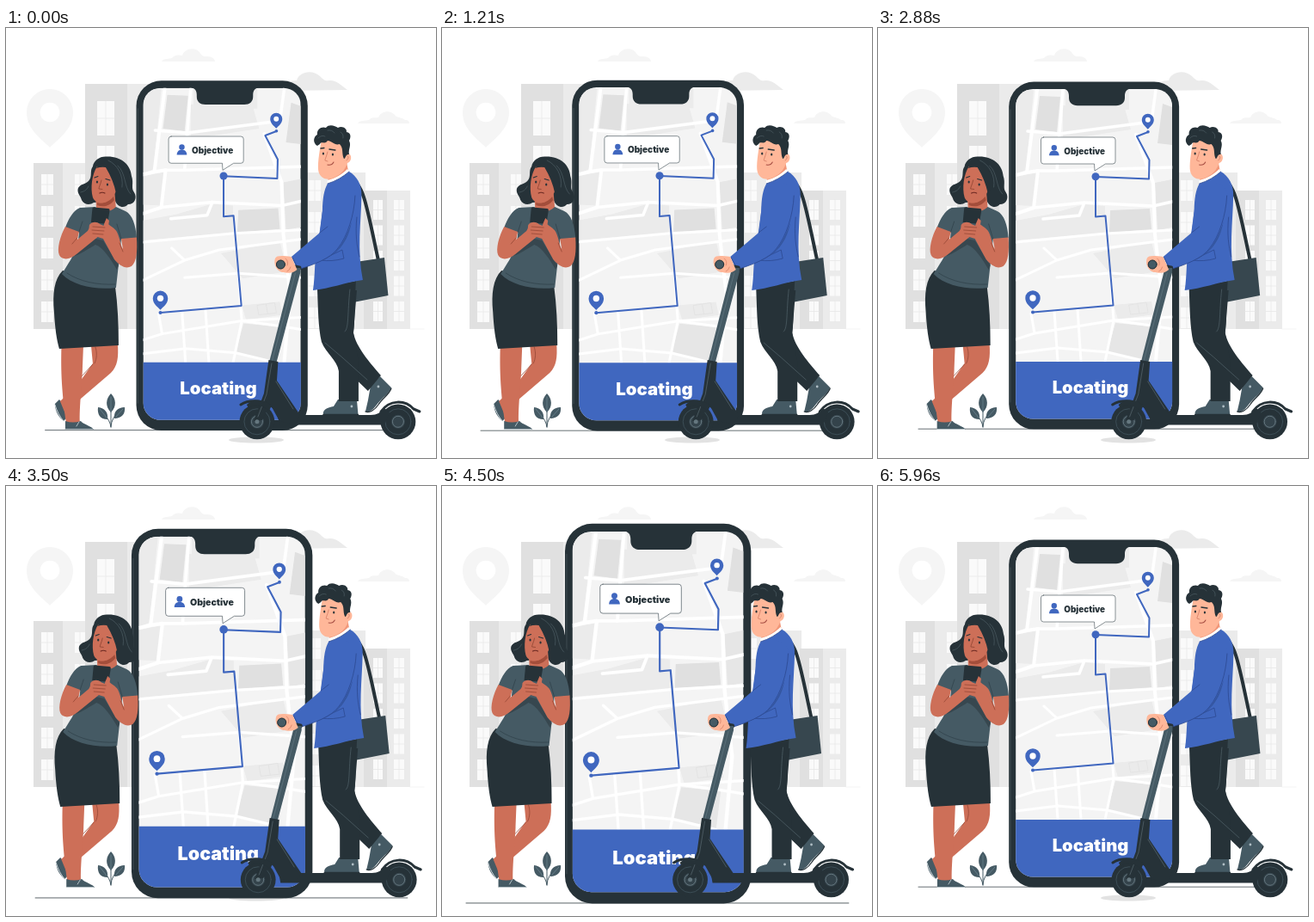
Recreate the animation shown at these times as an HTML page with a canvas. Size 500 px wide and 500 px high, loop 6 s.

```html
<!DOCTYPE html>
<html lang="en">
<head>
<meta charset="utf-8">
<title>Locating</title>
<style>
html, body { margin: 0; width: 100%; height: 100%; overflow: hidden; background: #fff; }
canvas { display: block; width: 500px; height: 500px; }
</style>
</head>
<body>
<canvas id="stage"></canvas>
<script>
const canvas = document.getElementById('stage');
const ctx = canvas.getContext('2d');
const dpr = window.devicePixelRatio || 1;
canvas.width = canvas.height = 500 * dpr;

const INK = '#263238', SLATE = '#455a64', BLUE = '#4067bf', NAVY = '#2c4a91';
const SKIN = '#cd6f58', SKIN_LINE = '#8f4331', PEACH = '#ffb799', PEACH_LINE = '#d9836a';

function fill(color, d) {
  ctx.fillStyle = color;
  ctx.fill(new Path2D(d));
}
function line(color, width, d) {
  ctx.strokeStyle = color;
  ctx.lineWidth = width;
  ctx.lineCap = ctx.lineJoin = 'round';
  ctx.stroke(new Path2D(d));
}
function rect(color, x, y, w, h, r = 0) {
  ctx.fillStyle = color;
  ctx.beginPath();
  ctx.roundRect(x, y, w, h, r);
  ctx.fill();
}
function oval(color, x, y, rx, ry = rx) {
  ctx.fillStyle = color;
  ctx.beginPath();
  ctx.ellipse(x, y, rx, ry, 0, 0, Math.PI * 2);
  ctx.fill();
}
function ring(color, width, x, y, r) {
  ctx.strokeStyle = color;
  ctx.lineWidth = width;
  ctx.beginPath();
  ctx.arc(x, y, r, 0, Math.PI * 2);
  ctx.stroke();
}
function text(str, x, y, size, color) {
  ctx.font = `900 ${size}px Inter, "Open Sans", sans-serif`;
  ctx.fillStyle = color;
  ctx.textAlign = 'center';
  ctx.fillText(str, x, y);
}
function pin(color, hole, x, y, r, tip) {
  fill(color, `M${x} ${y + tip}C${x - r * .35} ${y + r * 1.15} ${x - r} ${y + r * .75} ${x - r} ${y}` +
    `A${r} ${r} 0 0 1 ${x + r} ${y}C${x + r} ${y + r * .75} ${x + r * .35} ${y + r * 1.15} ${x} ${y + tip}Z`);
  oval(hole, x, y, r * .42);
}
function panes(x, y, w, h, step, count) {
  for (let i = 0; i < count; i++, y += step) {
    rect('#fafafa', x, y, w, h);
    line('#e6e6e6', .7, `M${x + w / 2} ${y}v${h}M${x} ${y + h / 2}h${w}`);
  }
}

function backdrop() {
  rect('#fff', 0, 0, 500, 500);
  fill('#f5f5f5', 'M181 39C183 35 190 36 193 35C197 30 202 32 205 32C207 25 218 21 225 28C228 33 230 33 234 33C239 33 243 36 243 39Z');
  fill('#ebebeb', 'M325 73C322 64 330 61 338 61C341 50 357 48 365 56C369 60 371 62 375 61C384 60 389 66 397 72Z');
  fill('#f5f5f5', 'M409 111C411 107 418 108 422 107C425 103 430 105 433 104C436 96 447 95 452 101C454 105 460 103 464 107C468 107 469 109 469 111Z');
  pin('#f5f5f5', '#fff', 51, 98, 27, 41);

  rect('#ebebeb', 66, 157, 46, 193);
  rect('#ebebeb', 141, 65, 40, 285);
  rect('#e0e0e0', 92, 65, 49, 285);
  rect('#e0e0e0', 32, 157, 34, 193);
  panes(106, 85, 20, 40, 52, 2);
  panes(41, 170, 14, 24, 37, 5);
  panes(80, 170, 12, 24, 37, 5);

  rect('#ebebeb', 345, 168, 73, 182);
  panes(352, 177, 14, 24, 37, 5);
  rect('#e0e0e0', 416, 189, 29, 161);
  rect('#ebebeb', 443, 189, 27, 161);
  panes(427, 200, 11, 23, 29.5, 5);
  panes(451, 200, 12, 23, 29.5, 5);
  line('#f1f1f1', .8, 'M470 350H486');
  oval('#e2e2e2', 291, 479, 32, 3.6);
}

function map() {
  rect('#f4f4f4', 160, 71, 182, 386);
  fill('#ebebeb', 'M160 72H181L172 165L160 170ZM160 173L186 168L181 207L160 206Z');
  fill('#ebebeb', 'M160 224L198 217L240 205L264 207V238L160 247ZM215 90H286L294 118L215 130Z');
  fill('#ebebeb', 'M218 72H292V95H218ZM250 262L318 248L326 283L275 291ZM274 322L318 318L321 333L279 339Z');
  fill('#e6e6e6', 'M276 343L318 347L313 387L267 376ZM322 180L342 176V232L325 235Z');
  fill('#e0e0e0', 'M188 79L212 80L208 121L183 118ZM331 88L342 92V136L325 134ZM270 212L316 210L318 234L269 238Z');
  const road = (w, d) => line('#fff', w, d);
  road(4, 'M185 72L173 168L160 171M173 168L186 166L181 209L160 216');
  road(3.5, 'M215 72L211 123L174 120M211 123L318 109L323 72M211 123L208 166L186 166');
  road(3.5, 'M208 166L342 162M181 209L240 203L320 207L342 202M240 203L234 218L192 222');
  road(4, 'M300 124L320 180L322 240L330 310L323 387');
  road(3, 'M160 249L265 239L342 235M160 293L208 270M193 256L208 270L248 258L342 246');
  road(3, 'M208 290L270 285L342 290M270 285L274 340L342 336');
  road(3, 'M178 332L182 355L160 362M205 329L209 388M182 355L274 340L264 388');
  road(3, 'M232 326L236 388M274 340L318 346L342 350M160 378L209 372L267 377L313 388');
  line('#e2e2e2', .8, 'M292 322L312 319L314 331L294 333ZM302 321L304 332');
}

function phone(scale) {
  ctx.save();
  ctx.translate(251, 264.5);
  ctx.scale(scale, scale);
  ctx.translate(-251, -264.5);

  line(INK, .7, 'M47 466.2H454');
  rect(INK, 152.2, 62.6, 197.9, 404, 29);
  line('#4d5b62', .6, 'M154 95V435');
  ctx.save();
  ctx.beginPath();
  ctx.roundRect(160.2, 71, 182, 383.5, 20);
  ctx.clip();
  map();
  rect(BLUE, 160, 388, 183, 70);
  ctx.restore();
  fill(INK, 'M214 70C220 71 222 74 222 79V81C222 87 226 90.2 232 90.2H277C283 90.2 287 87 287 81V79C287 74 289 71 295 70Z');
  text('Locating', 247, 425, 20.2, '#fff');

  line(BLUE, 2, 'M180 330.5L273.5 322.5L264.5 218.5L253 219.5V173L315 175.5L315.5 153.5L301 126L314 121');
  oval(BLUE, 180, 330.5, 2);
  oval(BLUE, 314, 120.8, 1.8);
  oval(BLUE, 253, 172.7, 4.5);
  pin(BLUE, '#fff', 180, 314, 8.7, 13.3);
  pin(BLUE, '#fff', 313.8, 106.8, 7, 11);

  const bubble = 'M192.5 127H273Q276 127 276 130V155Q276 158 273 158H264.5L252 166L251.5 158H192.5Q189.5 158 189.5 155V130Q189.5 127 192.5 127Z';
  fill('#fff', bubble);
  line('#59656b', .7, bubble);
  oval(BLUE, 204.8, 139.3, 3.2);
  fill(BLUE, 'M199 148.3C199 144.5 201.5 142.4 204.8 142.4C208 142.4 210.6 144.5 210.6 148.3Z');
  text('Objective', 240.2, 146.6, 9.9, INK);
  ctx.restore();
}

function plant() {
  line(SLATE, 1, 'M122 464V440M122 464Q121 456 114 449M122 463Q123 453 131 446');
  fill(SLATE, 'M122 447C115 440 116 431 122 425C128 431 129 440 122 447Z');
  fill(SLATE, 'M118 455C109 455 106 449 107 441C115 442 119 447 118 455Z');
  fill(SLATE, 'M126 454C125 446 130 441 138 441C139 449 134 454 126 454Z');
  line('#78909c', .6, 'M122 429V446M109 443L117 453M136 443L128 452');
}

function woman() {
  // back leg and shoe
  fill(SLATE, 'M62 432L57 437C57 446 62 453 67 457L70 454L69 440Z');
  line('#cfd8dc', 1, 'M57 438Q60 449 67 457');
  fill(SKIN, 'M99 369L130 367C131 383 130 393 122 401L87 431L70 451L63 434L84 414L101 390Z');
  line(SKIN_LINE, .7, 'M103 390C106 384 106 377 104 371M101 391L88 405');
  // front leg and shoe
  fill(SKIN, 'M64.5 370C64 392 64 418 70 459H86C85 442 89 408 89 395L90 370Z');
  fill(SLATE, 'M69 457Q78 460 87 457C90 461 100 463 102 467H69Z');
  line('#cfd8dc', .8, 'M69 466.5H101M85 458L82 463');
  // skirt
  fill(INK, 'M66 282C56 292 54 309 56 330C57 349 59 363 62 373L131 369C131 345 130 322 127 300Z');

  // hair, neck and face
  fill(INK, 'M117 149.5C109 149 102 154 101 161C97 166 101 173 96 178C92 182 87 181 84 186C82 192 87 195 88 200C91 206 98 206 102 203L127 201C130 209 138 210 142 205C150 205 153 197 149 191C145 186 149 180 146 172C145 159 134 149 117 149.5Z');
  fill(SKIN, 'M104 190L105 209C111 216 124 215 128 210L126 186Z');
  fill('#a34e3b', 'M106 203C113 205 120 202 125 196L126 200C121 207 113 209 106 206Z');
  fill(SKIN, 'M106 161C100 170 98 186 101 197C104 205 115 205 121 199C126 195 130 188 130 181C124 178 120 169 117 160Z');
  fill(INK, 'M105 163C108 158 114 156 120 157C129 161 133 170 133 186L128 192C126 182 122 172 116 162Q111 161 105 163Z');
  line('#53636a', .6, 'M119 154C130 159 137 172 135 185M130 160C140 169 137 185 145 193M96 184C93 190 90 190 87 191');
  line(INK, 1.1, 'M103 174L107 172.5M116 175.5L121 177');
  oval(INK, 106, 179, 1.1, 1.5);
  oval(INK, 118, 182, 1.1, 1.5);
  line(SKIN_LINE, .8, 'M111 177C110 182 108 185 108 187L112 187.5');
  line('#6d2a23', 1.2, 'M109 192Q112 190.5 115 192');

  // top
  fill(SLATE, 'M104 208L86 209C78 212 73 222 69 232L85 238C84 256 77 267 70 278L65 286C78 300 106 305 128 302L131 275L134 246L152 244C151 229 147 217 139 213L128 208C121 215 110 215 104 208Z');
  line('#2f4048', .7, 'M85 237L89 225M134 245L129 228M82 263C92 258 98 252 103 248M131 274L123 262M71 285C86 295 106 299 127 298');
  fill('#37474f', 'M84 258L103 245L113 247L127 270L131 276L129 281C122 269 113 255 104 252C97 256 87 263 80 265Z');
  // arms
  fill(SKIN, 'M69 231L85 237L83 246L95 236C98 230 102 228 108 227L113 233L108 242L82 263C74 270 65 270 62 264C59 257 63 242 69 231Z');
  fill(SKIN, 'M134 245L152 243.5C153 260 152 272 146 277C139 281 132 276 126 269L113 245L97 240L99 234L112 232L116 226C121 230 127 233 129 237C133 245 133 253 136 257Z');
  fill(INK, 'M102 208.5L119 210Q121 210 120.5 213L118 228L99 226L100.5 210Q100.5 208.5 102 208.5Z');
  fill(SKIN, 'M97 229C100 225 106 225 109 228L116 231L117 234L107 236L113 240Q110 244 102 241L96 238Z');
  fill(SKIN, 'M117 221L120 224L119 231L115 232L114 228Z');
  line(SKIN_LINE, .7, 'M101 231L115 232M100 235L114 236M101 239L113 240M132 250L136 260M83 244L77 251');
}

function wheel(x) {
  oval(INK, x, 457.8, 20.4);
  ring(SLATE, .7, x, 457.8, 15);
  oval('#34434b', x, 457.8, 8);
  ring('#65777f', 1, x, 457.8, 6.5);
}

function man() {
  // strap and bag
  line(INK, 4, 'M402 177C416 181 420 210 433 270');
  fill('#37474f', 'M407 272L440 267L444.5 311L404 319Z');

  // shoes
  fill(SLATE, 'M435 405L448 418C446 425 438 429 432 437C428 443 422 448 418 446L421 433L424 416Z');
  line(INK, 1.3, 'M448 419C446 426 438 430 433 438C429 444 423 448 418 446');
  fill(SLATE, 'M386 432H408L409.5 449H369C368 444 374 441 381 440Z');
  line(INK, 1.4, 'M369 449.5H409.5');
  oval('#b0bec5', 402, 440, 1.4);
  oval('#b0bec5', 433, 417, 1.4);

  // trousers
  fill(INK, 'M372 305H408L404 354C407 371 423 389 436 404L421 422L392 394L372 366Z');
  fill(INK, 'M362 302L407 294C405 325 406 341 404 355L410 388L410 434H387V399C385 386 372 378 367 365C363 348 363 326 362 302Z');
  line('#52636b', .7, 'M400 304C397 331 399 349 394 353M371 366L391 383L420 409');

  // neck and jacket
  fill('#f19779', 'M374 168L375 180C384 179 393 172 398 166L395 150Z');
  fill('#fff', 'M374 177C383 175 391 170 397 164L400 168L386 179L373 184Z');
  fill(BLUE, 'M374 181C384 178 392 173 399 167C408 172 414 182 413.5 195C413 225 408 258 415 293C394 296 377 303 357 305C360 287 358 269 363 250L368 213C368 198 370 188 374 181Z');
  line(NAVY, .8, 'M374 181C384 178 392 173 399 167M366 270L391 258L393 268Q379 272 366 270M408 220C406 240 408 253 411 266');
  fill('#34569f', 'M365 263C384 258 397 239 402 225C398 249 386 264 362 273Z');
  fill(BLUE, 'M375 183C368 197 368 220 365 238L332 266L339 281C356 276 377 268 386 257C399 241 407 214 407 195C406 181 391 175 375 183Z');
  line(NAVY, .8, 'M406 195C405 218 397 242 386 256C378 268 356 276 339 281M365 238L374 231M333 267L340 280');

  // head
  fill(PEACH, 'M367 130C364 146 362 160 363.5 167C366 177 377 178 385 172C391 169 395 163 397 157C402 156 403 147 398 146L394 129Z');
  fill(INK, 'M362 137C356 133 358 126 362 124C361 117 368 114 372 116C376 111 383 114 386 116C391 113 397 117 396 121C402 122 401 128 399 131C402 137 398 140 399 147C395 146 395 152 393 152C390 146 393 140 388 135C382 137 379 131 374 131C371 136 367 131 365 135Z');
  line('#53636a', .6, 'M363 128Q367 124 371 126M374 119Q379 118 382 122M389 121Q393 123 392 128');
  line(INK, 1.3, 'M366 140L370 139.5M376 141L383 142');
  oval(INK, 369, 146, 1.1, 1.5);
  oval(INK, 380, 147, 1.1, 1.5);
  line(PEACH_LINE, .9, 'M374 144C373 149 371 152 371 154L374 155M397 149Q400 150 396 154');
  line('#a64e43', 1.1, 'M374 159Q379 160 381 156');
}

function scooter() {
  // handle and stem
  line(INK, 5, 'M321 275L341 279');
  fill(SLATE, 'M334 279H342.5V284L314 391L306 389Z');
  line('#5f747e', .8, 'M336.5 285L309.5 387');
  fill(PEACH, 'M332 266L338.5 281C332 287 326 284 321 284C314 282 311 274 313 268C315 264 322 265 332 266Z');
  oval(SLATE, 319.5, 275, 5.3);
  ring(INK, 1, 319.5, 275, 5);
  line(PEACH_LINE, .8, 'M325 268Q329 271 327 276M327 283Q330 282 331 278');

  wheel(292);
  wheel(456);
  // deck and fenders
  fill(INK, 'M316 450H424C432 450 435 447 440 442L446 447L440 461.5H318Z');
  line(INK, 3, 'M273 438C282 432 301 432 311 441M436 446C446 432 464 432 474 443L481 446');
  fill(INK, 'M305.5 386L316.5 388L315 410L342 450L336 461L318 457L307 437L298 456L288 457L300 425Z');
  line('#53636a', .8, 'M309 390L303 426L293 452M314 411L334 443');
  fill(INK, 'M280 438C289 430 299 431 309 439L306 445C296 437 288 438 282 442Z');
  oval('#65777f', 292, 457.8, 2.5);
}

// piecewise linear track of [percent, value] pairs
function track(keys, at) {
  const i = keys.findIndex(k => k[0] > at);
  const [a, from] = keys[i - 1], [b, to] = keys[i];
  return from + (to - from) * (at - a) / (b - a);
}
const BEAT = [[0, 1], [10, 1.1], [30, 1], [40, 1], [50, 1.1], [60, 1], [101, 1]];
const SHAKE = [[0, 0], [10, -1], [20, 2], [30, -4], [40, 4], [50, -4], [60, 4], [70, -4], [80, 2], [90, -1], [100, 0]];

function draw(ms) {
  // 24 pictures a second, each sampled at its middle
  const step = Math.floor((ms % 6000 + 4) * .024);
  const at = ((step + .5) / 24 % 3) / 3 * 100;
  ctx.setTransform(dpr, 0, 0, dpr, 0, 0);
  backdrop();
  phone(track(BEAT, at));
  plant();
  ctx.translate(track(SHAKE, at), 0);
  woman();
  man();
  scooter();
}

let start;
function tick(now) {
  start ??= now;
  draw(Math.max(0, now - start));
  requestAnimationFrame(tick);
}
draw(0);
requestAnimationFrame(tick);
</script>
</body>
</html>
```
